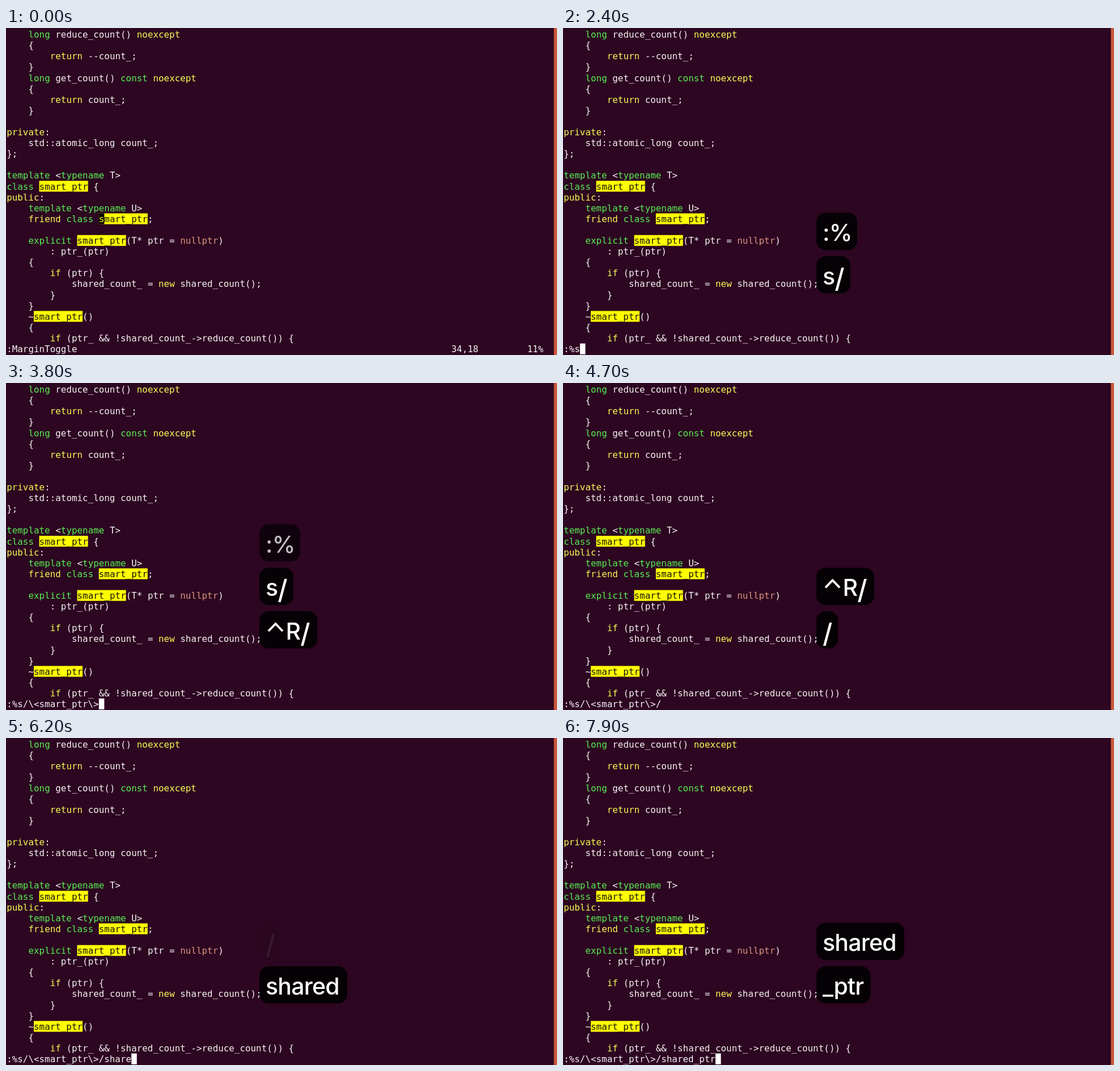
Write an HTML page with a canvas that moves like this. It is 972x576 px and loops after 8 s.

```html
<!DOCTYPE html>
<html lang="en">
<head>
<meta charset="utf-8">
<title>Editor substitution</title>
<style>
html, body { margin: 0; width: 972px; height: 576px; overflow: hidden; background: #2d0621; }
canvas { display: block; }
</style>
</head>
<body>
<canvas id="stage" width="972" height="576"></canvas>
<script>
const ctx = document.getElementById('stage').getContext('2d');
const LOOP = 8000, COL = 9.565, ROW = 19.1, LEFT = 1.2, TOP = 1.8;
const MONO = '15.88px "DejaVu Sans Mono", monospace';
const sans = size => `500 ${size}px Inter, "Liberation Sans", sans-serif`;
const WHITE = '#f7f3f5', GREEN = '#58ee54', YELLOW = '#fcfa58', PINK = '#dc9480';

const code = `    long reduce_count() noexcept
    {
        return --count_;
    }
    long get_count() const noexcept
    {
        return count_;
    }

private:
    std::atomic_long count_;
};

template <typename T>
class smart_ptr {
public:
    template <typename U>
    friend class smart_ptr;

    explicit smart_ptr(T* ptr = nullptr)
        : ptr_(ptr)
    {
        if (ptr) {
            shared_count_ = new shared_count();
        }
    }
    ~smart_ptr()
    {
        if (ptr_ && !shared_count_->reduce_count()) {`.split('\n');

const types = /^(long|const|template|typename|class|explicit)$/;
const words = /^(noexcept|return|private|public|friend|if|new)$/;

// Time each key arrives, its cap group, and what the command line then reads.
const found = ':%s/\\<smart_ptr\\>';
const keys = [
  [1450, 0, ':', ':'], [1750, 0, '%', ':%'],
  [2150, 1, 's', ':%s'], [2350, 1, '/', ':%s/'],
  [3050, 2, '^R', ':%s/"'], [3250, 2, '/', found],
  [3950, 3, '/', found + '/']
];
function typeWord(text, group, times) {
  [...text].forEach((ch, i) => {
    keys.push([times[i], group, ch, keys[keys.length - 1][3] + ch]);
  });
}
typeWord('shared', 4, [5550, 5750, 5850, 5950, 6050, 6150]);
typeWord('_ptr', 5, [7050, 7350, 7450, 7550]);

const LAG = 90, BLINK = 600, HOLD = 1975, FADE = 300;
const capWidth = { ':%': 72, 's/': 60, '^R/': 102, '/': 38, 's': 45, 'shared': 155, '_ptr': 95.5 };

const colX = c => LEFT + c * COL;
const rowY = r => TOP + r * ROW;

function put(text, col, row, color) {
  ctx.font = MONO;
  ctx.fillStyle = color;
  ctx.fillText(text, colX(col), rowY(row) + 15.3);
}

function cell(col, row, color, count = 1) {
  ctx.fillStyle = color;
  ctx.fillRect(colX(col), rowY(row), count * COL, ROW);
}

function tint(word) {
  if (types.test(word)) return GREEN;
  if (words.test(word)) return YELLOW;
  return word === 'nullptr' ? PINK : WHITE;
}

function drawCode() {
  code.forEach((line, row) => {
    for (const m of line.matchAll(/\w+|[^\w\s]+/g)) {
      const hit = m[0] === 'smart_ptr';
      if (hit) cell(m.index, row, '#ffff00', 9);
      put(m[0], m.index, row, hit ? '#18100c' : tint(m[0]));
    }
  });
}

function drawCommand(t) {
  const last = keys.filter(k => k[0] + LAG <= t).pop();
  const lit = Math.floor((t - (last ? last[0] + LAG : 0)) / BLINK) % 2 === 0;
  if (!last) {
    put(':MarginToggle', 0, 29, WHITE);
    put('34,18', 82, 29, WHITE);
    put('11%', 96, 29, WHITE);
    if (lit) {
      cell(17, 17, '#080404');
      put('s', 17, 17, '#ffff00');
    }
    return;
  }
  const line = last[3], pending = line.endsWith('"');
  put(line, 0, 29, WHITE);
  if (lit) {
    const col = line.length - (pending ? 1 : 0);
    cell(col, 29, '#ffffff');
    if (pending) put('"', col, 29, '#2d0621');
  }
}

// The control mark is a wide chevron; the slash is tall and hangs below the line.
function drawLabel(text, x, base) {
  for (const part of text.match(/[\^\/]|[^\^\/]+/g)) {
    if (part === '^') {
      ctx.lineWidth = 3.8;
      ctx.beginPath();
      ctx.moveTo(x + 5, base - 15);
      ctx.lineTo(x + 17.5, base - 28);
      ctx.lineTo(x + 30, base - 15);
      ctx.stroke();
      x += 35.5;
    } else {
      const slash = part === '/';
      ctx.font = sans(slash ? 47 : 41);
      ctx.fillText(part, x, base + (slash ? 5.5 : 0));
      x += ctx.measureText(part).width;
    }
  }
}

function drawCaps(t) {
  const caps = [];
  for (const [at, group, label] of keys) {
    if (at > t) break;
    const cap = caps[group] || (caps[group] = { text: '' });
    cap.text += label;
    cap.last = at;
  }
  ctx.letterSpacing = '-0.8px';
  caps.forEach((cap, i) => {
    const alpha = 1 - Math.max(0, t - cap.last - HOLD) / FADE;
    if (alpha <= 0) return;
    const y = 402 - (caps.length - 1 - i) * 76.6;
    ctx.font = sans(41);
    const width = capWidth[cap.text] || ctx.measureText(cap.text).width + 24;
    ctx.globalAlpha = alpha;
    ctx.fillStyle = 'rgba(0,0,0,0.86)';
    ctx.beginPath();
    ctx.roundRect(447, y, width, 65.5, 16);
    ctx.fill();
    ctx.fillStyle = ctx.strokeStyle = '#ffffff';
    drawLabel(cap.text, 458, y + 50);
  });
  ctx.globalAlpha = 1;
  ctx.letterSpacing = '0px';
}

function draw(t) {
  ctx.fillStyle = '#2d0621';
  ctx.fillRect(0, 0, 972, 576);
  ctx.fillStyle = '#c9583a';
  ctx.fillRect(966.5, 0, 5.5, 576);
  drawCode();
  drawCommand(t);
  drawCaps(t);
}

const start = performance.now();
function tick() {
  draw((performance.now() - start) % LOOP);
  requestAnimationFrame(tick);
}
tick();
</script>
</body>
</html>
```
